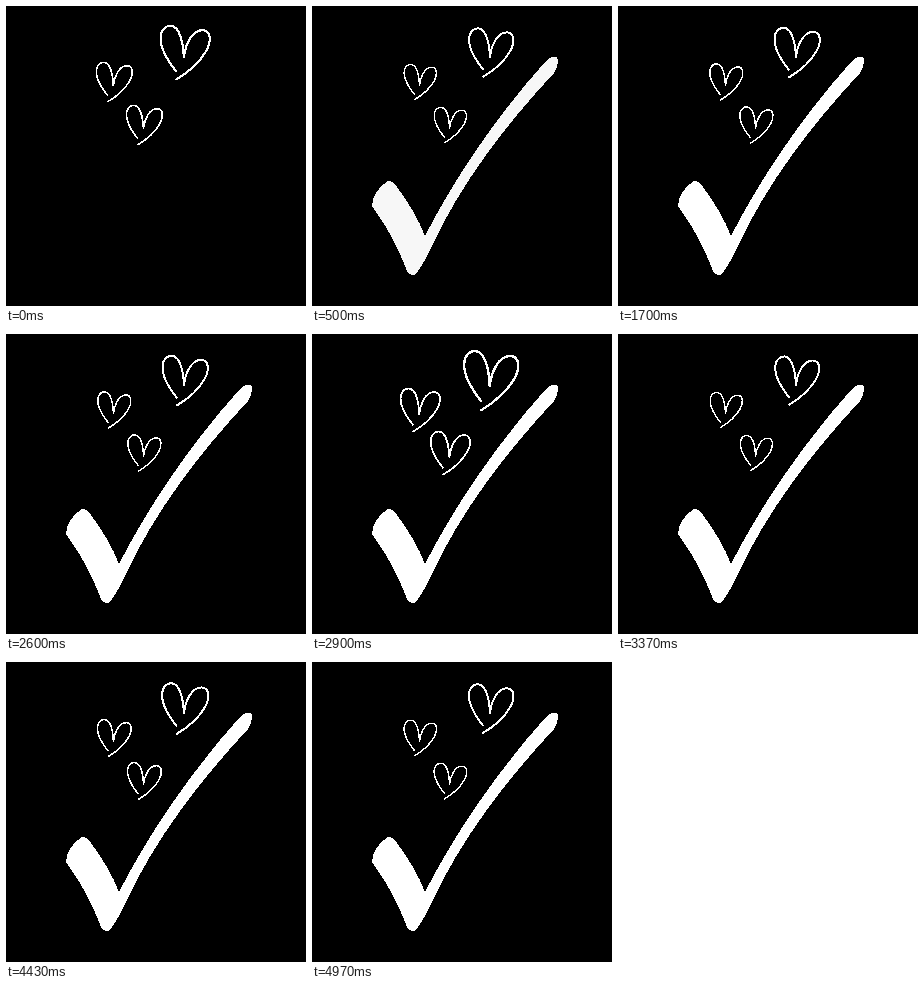
Animation, 300 px wide and 300 px high, one loop 5010 ms. Source, as an HTML page:

```html
<!DOCTYPE html>
<html lang="en">
<head>
<meta charset="utf-8">
<title>Check and hearts</title>
<style>
  html, body { margin: 0; height: 100%; overflow: hidden; background: #000; }
  svg { display: block; width: 100vw; height: 100vh; fill: #fff; shape-rendering: crispEdges; }
  #hearts { fill: none; stroke: #fff; stroke-width: 2.2; stroke-linecap: round; stroke-linejoin: round; }
</style>
</head>
<body>
<svg viewBox="0 0 300 300">
  <defs>
    <path id="heart" d="M-9.5 18.5 C-21 4 -27 -10 -24 -20 Q-21 -27 -14.5 -27 C-5 -26 -2 -8 -1.5 5
      C0 -7 6 -22.5 17.5 -22.5 C26.5 -22 26 -10 21 -1.5 C15 9 3 20 -9 27"/>
  </defs>
  <path id="check" d="M60 199 C61 190 66 181 76 175 Q80 174 85 181 C96 196 106 212 113 230
    C137.5 181.5 179.5 115.5 234 55 Q241 49 245 51 Q248 56 242 67 C195 117.5 149 176.5 119 242
    Q112 257 104 268 Q100 270 96 267 C85 240 76 222 62 203 Q60 201 60 199 Z"/>
  <g id="hearts">
    <use href="#heart"/>
    <use href="#heart"/>
    <use href="#heart"/>
  </g>
</svg>
<script>
  const LOOP = 5010, BEAT = 900, PEAK = 165, FADE_START = 30, FADE = 570;
  const places = [[179.3, 46.5, 1], [108.4, 76, 0.73], [138.5, 119, 0.73]]; // x, y, size
  const check = document.getElementById("check");
  const hearts = [...document.getElementById("hearts").children];
  const start = performance.now();

  function draw(now) {
    const t = Math.max(0, now - start) % LOOP;

    // Short swell, long rest
    const swell = Math.cos(Math.PI * (t - PEAK) / BEAT) ** 4;
    const scale = 0.89 + 0.21 * swell;
    hearts.forEach((heart, i) => {
      const [x, y, size] = places[i];
      heart.setAttribute("transform", `translate(${x} ${y}) scale(${size * scale})`);
    });

    const faded = Math.min(Math.max((t - FADE_START) / FADE, 0), 1);
    check.setAttribute("opacity", 1 - (1 - faded) ** 2);
    requestAnimationFrame(draw);
  }
  draw(start);
</script>
</body>
</html>
```
